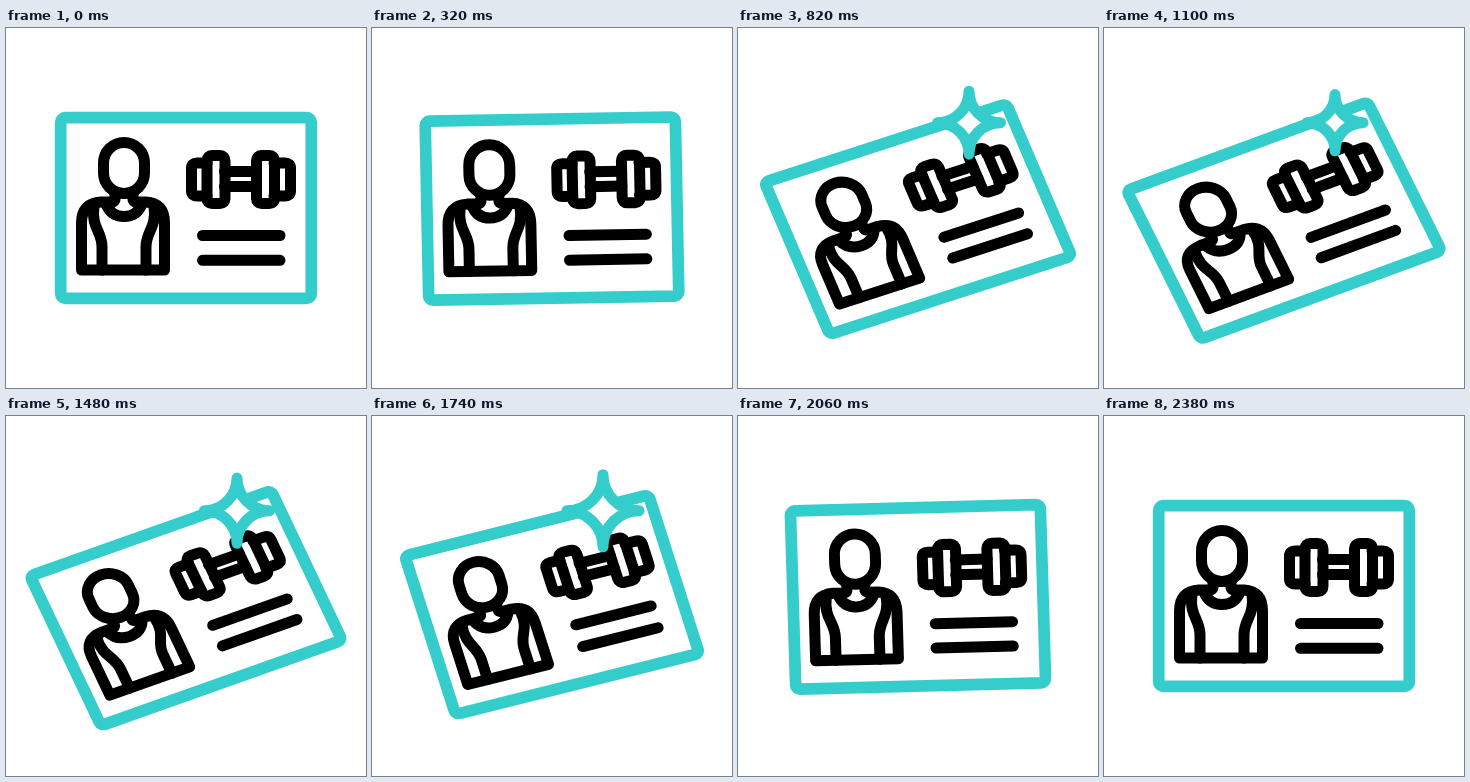
Animation of 360 by 360 pixels, one loop 2400 ms. Source, as an HTML page:

```html
<!DOCTYPE html>
<html lang="en">
<head>
<meta charset="utf-8">
<title>Gym card</title>
<style>
  html, body { margin: 0; width: 100%; height: 100%; overflow: hidden; background: #fff; }
  svg { display: block; }
  svg * { vector-effect: non-scaling-stroke; }
</style>
</head>
<body>
<svg width="360" height="360" viewBox="0 0 360 360" fill="none" stroke="#000" stroke-width="11"
     stroke-linecap="round" stroke-linejoin="round">
  <!-- card content is drawn around the card centre -->
  <g id="card">
    <rect x="-125.3" y="-90.3" width="250.6" height="180.6" rx="4.5" stroke="#35cccc" stroke-width="11.7"/>
    <g transform="translate(-180 -180)">
      <rect x="97.5" y="114.5" width="41" height="51" rx="20.5"/>
      <path d="M109 164V171Q109 174 105 174H95Q75.5 175 75.5 195V242H158.5V195Q158.5 175 140 174H131Q127 174 127 171V164"/>
      <path d="M100 176Q105 188.5 118 188.5T136 176"/>
      <path d="M88 178C85 200 96 203 96 219V242M148 178C151 200 140 203 140 219V242"/>
      <rect x="201" y="127.5" width="18" height="48" rx="5"/>
      <rect x="250.5" y="127.5" width="18" height="48" rx="5"/>
      <path d="M201 135H191Q185.5 135 185.5 140V163Q185.5 168 191 168H201M268 135H279Q284.5 135 284.5 140V163Q284.5 168 279 168H268"/>
      <path d="M218.5 143.5H250.5M218.5 158.5H250.5"/>
      <path d="M196.5 207.5H274M196.5 232.3H274"/>
    </g>
  </g>
  <path id="star" fill="#fff" stroke="#35cccc"
        d="M0-38C0-17 17 0 38 0C17 0 0 17 0 38C0 17-17 0-38 0C-17 0 0-17 0-38Z"/>
</svg>
<script>
const LOOP = 2400;
const SWING = 1180;
const card = document.getElementById('card');
const star = document.getElementById('star');
const clamp = x => Math.min(1, Math.max(0, x));
const smooth = x => x * x * (3 - 2 * x);

// Symmetric cubic-bezier(.75, 0, .25, 1)
function ease(x) {
  let lo = 0, hi = 1;
  for (let i = 0; i < 24; i++) {
    const s = (lo + hi) / 2, r = 1 - s;
    if (2.25 * s * r * r + 0.75 * s * s * r + s * s * s < x) lo = s; else hi = s;
  }
  return smooth((lo + hi) / 2);
}

const starKeys = [[600, 0], [900, 1], [1200, 0.65], [1700, 1], [2000, 0]];
function starSize(t) {
  for (let i = 1; i < starKeys.length; i++) {
    const [t0, a] = starKeys[i - 1], [t1, b] = starKeys[i];
    if (t > t0 && t <= t1) return a + (b - a) * smooth((t - t0) / (t1 - t0));
  }
  return 0;
}

function draw(now) {
  const t = now % LOOP;
  const p = ease(clamp(Math.min(t - 40, 2392 - t) / SWING));
  // The corners travel in straight lines, so the matrix itself is interpolated
  const m = [1 - 0.04 * p, -0.356 * p, 0.411 * p, 1 - 0.179 * p, 180, 180 + 12.7 * p];
  card.setAttribute('transform', `matrix(${m.map(v => v.toFixed(5))})`);

  const s = starSize(t);
  star.style.visibility = s > 0 ? 'visible' : 'hidden';
  star.setAttribute('transform', `translate(231 94.7) scale(${Math.max(s, 0.001)})`);
  requestAnimationFrame(draw);
}
draw(performance.now());
</script>
</body>
</html>
```
